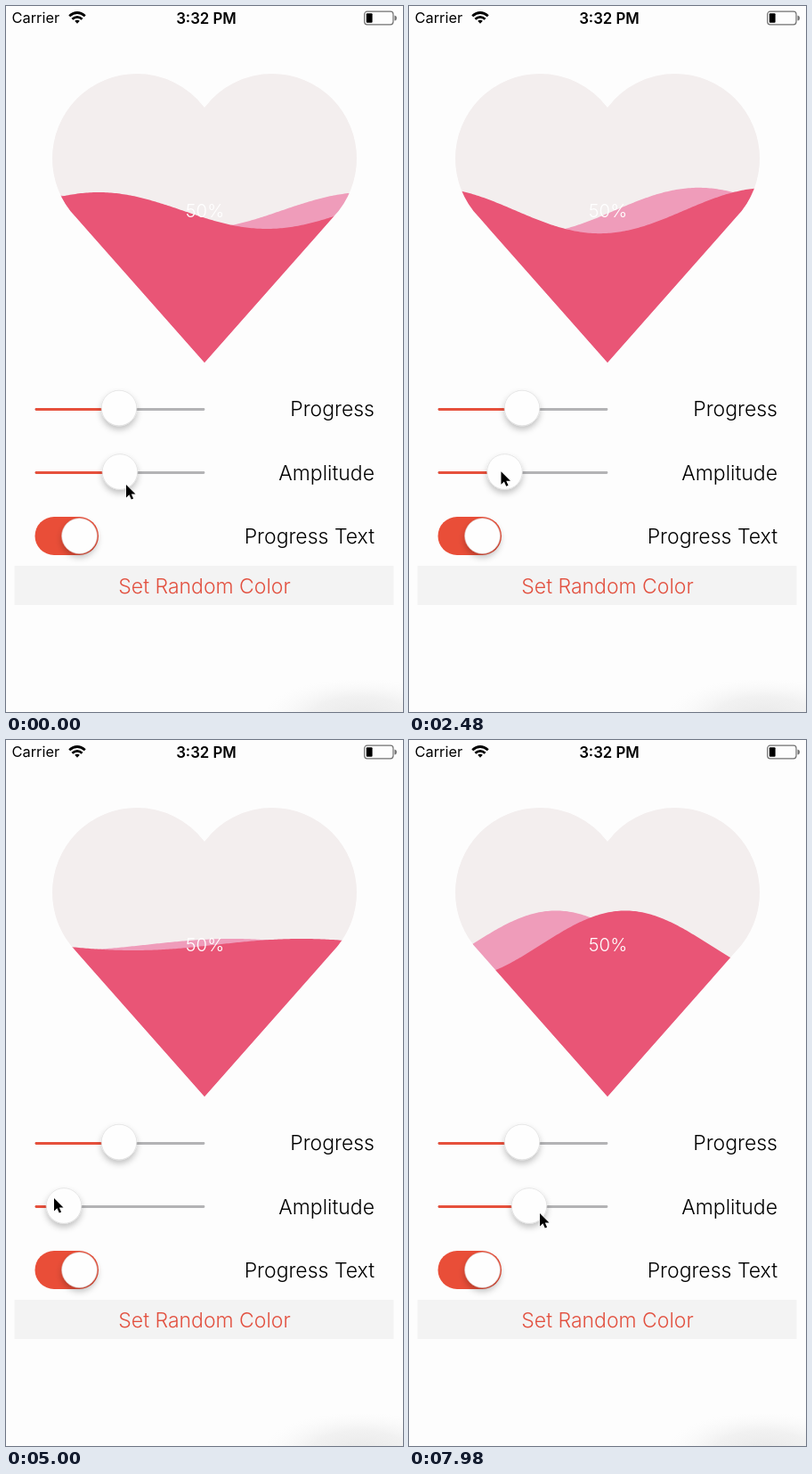
Recreate the animation shown at these times as an HTML page. Size 446 by 792 pixels, loop 8000 ms.

```html
<!DOCTYPE html>
<html lang="en">
<head>
<meta charset="utf-8">
<title>Wave heart</title>
<style>
  html, body { margin: 0; width: 100%; height: 100%; overflow: hidden; background: #fdfdfd; }
  svg { display: block; width: 100vw; height: 100vh; }
  text { font-family: Inter, "Open Sans", sans-serif; font-size: 23px; font-weight: 300; }
  .status { font-size: 16.4px; font-weight: 400; }
  .clock { font-size: 16.8px; font-weight: 600; }
  .percent { font-size: 20.3px; fill: #fff; }
  .end { text-anchor: end; }
  .mid { text-anchor: middle; }
</style>
</head>
<body>
<svg viewBox="0 0 446 792">
  <defs>
    <clipPath id="heart">
      <circle cx="147" cy="171" r="95"/>
      <circle cx="299" cy="171" r="95"/>
      <path d="M223 113.500L75.700 233.700 223 400 370.300 233.700Z"/>
    </clipPath>
    <radialGradient id="glow">
      <stop offset="0" stop-color="#e9e9e9"/>
      <stop offset=".5" stop-color="#eeeeee" stop-opacity=".8"/>
      <stop offset="1" stop-color="#f8f8f8" stop-opacity="0"/>
    </radialGradient>
    <filter id="shadow" x="-50%" y="-50%" width="200%" height="200%">
      <feDropShadow dx="0" dy="4" stdDeviation="3.500" flood-color="#000" flood-opacity=".24"/>
    </filter>
    <g id="knob">
      <circle r="19.800" fill="#fefefe" stroke="#d8d8d8" stroke-width=".6" filter="url(#shadow)"/>
    </g>
  </defs>

  <rect width="446" height="792" fill="#fdfdfd"/>
  <ellipse cx="398" cy="796" rx="108" ry="42" fill="url(#glow)"/>

  <text class="status" x="6.500" y="19.300">Carrier</text>
  <g fill="none" stroke="#000" stroke-width="2.800">
    <path d="M71.200 11.200Q80 3.800 88.800 11.200M74.400 14.700Q80 10 85.600 14.700"/>
    <path d="M77.200 16.800Q80 14.600 82.800 16.800L80 19.800Z" fill="#000" stroke="none"/>
  </g>
  <text class="clock mid" x="225" y="19.500">3:32 PM</text>
  <rect x="402.700" y="6.200" width="32.300" height="14.600" rx="3" fill="none" stroke="#707070" stroke-width="1.200"/>
  <path d="M436.500 10.500q2.500 .5 2.500 3t-2.500 3z" fill="#707070"/>
  <rect x="404.800" y="8.300" width="6.800" height="10.400" rx="1" fill="#000"/>

  <g clip-path="url(#heart)">
    <rect x="50" y="74" width="346" height="328" fill="#f3eeee"/>
    <path id="back" fill="#ef9cba"/>
    <path id="front" fill="#e95576"/>
  </g>
  <text class="percent mid" x="223.500" y="236.500">50%</text>

  <g stroke-width="2.800" stroke-linecap="round">
    <path d="M34 452.500H222M34 523.500H222" stroke="#b3b3b5"/>
    <path d="M34 452.500H127" stroke="#e6503c"/>
    <path id="fill" stroke="#e6503c"/>
  </g>
  <use href="#knob" x="127" y="451"/>
  <use href="#knob" id="thumb" y="522.500"/>
  <rect x="32.500" y="573" width="71.500" height="43" rx="21.500" fill="#e94e38"/>
  <use href="#knob" x="82.500" y="594.500"/>

  <text class="end" x="414" y="460">Progress</text>
  <text class="end" x="414" y="531.500">Amplitude</text>
  <text class="end" x="414" y="603">Progress Text</text>
  <rect x="9.500" y="628" width="426" height="44" fill="#f3f3f3"/>
  <text class="mid" x="223" y="659" fill="#e2503f">Set Random Color</text>

  <path id="cursor" d="M0 0V14.500L3.400 11.300 5.800 16.600 8.100 15.600 5.800 10.500H10.500Z"
        fill="#000" stroke="#fff" stroke-width="1" stroke-linejoin="round" paint-order="stroke"/>
</svg>
<script>
const LOOP = 8000, GROUP = 140;
const LEVEL = 229.5, WAVE = 378, LAG = 78;
const DRAG_START = 21, REST_AMP = 20.5;

// step, thumb x, wave trough x, cursor x, cursor y
const keys = [
  [0, 128, 293, 135, 537],
  [21, 128, 261, 132, 536],
  [37, 123, 237, 124, 530],
  [66, 91, 194, 83, 517],
  [106, 65, 143, 54, 514],
  [132, 88, 111, 87, 524],
  [150, 114, 88, 126, 529],
  [171, 135, 54, 147, 531]
];
const $ = id => document.getElementById(id);

const secant = (i, c) => (keys[i + 1][c] - keys[i][c]) / (keys[i + 1][0] - keys[i][0]);

// Monotone cubic slope at a key
function slope(i, c) {
  if (i === 0) return secant(0, c);
  if (i === keys.length - 1) return secant(i - 1, c);
  const a = secant(i - 1, c), b = secant(i, c);
  return a * b > 0 ? 2 * a * b / (a + b) : 0;
}

function sample(step, c) {
  let i = 0;
  while (i < keys.length - 2 && step >= keys[i + 1][0]) i++;
  const [p, q] = [keys[i], keys[i + 1]];
  const h = q[0] - p[0], u = (step - p[0]) / h, v = 1 - u;
  return v * v * (1 + 2 * u) * p[c] + u * u * (3 - 2 * u) * q[c]
    + h * u * v * (v * slope(i, c) - u * slope(i + 1, c));
}

function wavePath(trough, amp) {
  let d = "M48 402";
  for (let x = 48; x <= 398; x += 2) {
    const y = LEVEL + amp * Math.cos((x - trough) / WAVE * 2 * Math.PI);
    d += `L${x} ${y.toFixed(2)}`;
  }
  return d + "V402Z";
}

// Three steps per group, lasting 100, 20 and 20 ms
function stepAt(t) {
  const rest = t % GROUP;
  return 3 * Math.floor(t / GROUP) + (rest >= 100) + (rest >= 120);
}

function draw(now) {
  const step = stepAt(now % LOOP);
  const thumb = sample(step, 1), trough = sample(step, 2);
  const amp = step < DRAG_START ? REST_AMP : 0.45 * (thumb - 50.5);
  $("front").setAttribute("d", wavePath(trough, amp));
  $("back").setAttribute("d", wavePath(trough - LAG, amp));
  $("fill").setAttribute("d", `M34 523.5H${thumb}`);
  $("thumb").setAttribute("x", thumb);
  $("cursor").setAttribute("transform", `translate(${sample(step, 3)} ${sample(step, 4)})`);
}

let origin;
function tick(now) {
  origin ??= now;
  draw(now - origin);
  requestAnimationFrame(tick);
}
draw(0);
requestAnimationFrame(tick);
</script>
</body>
</html>
```
